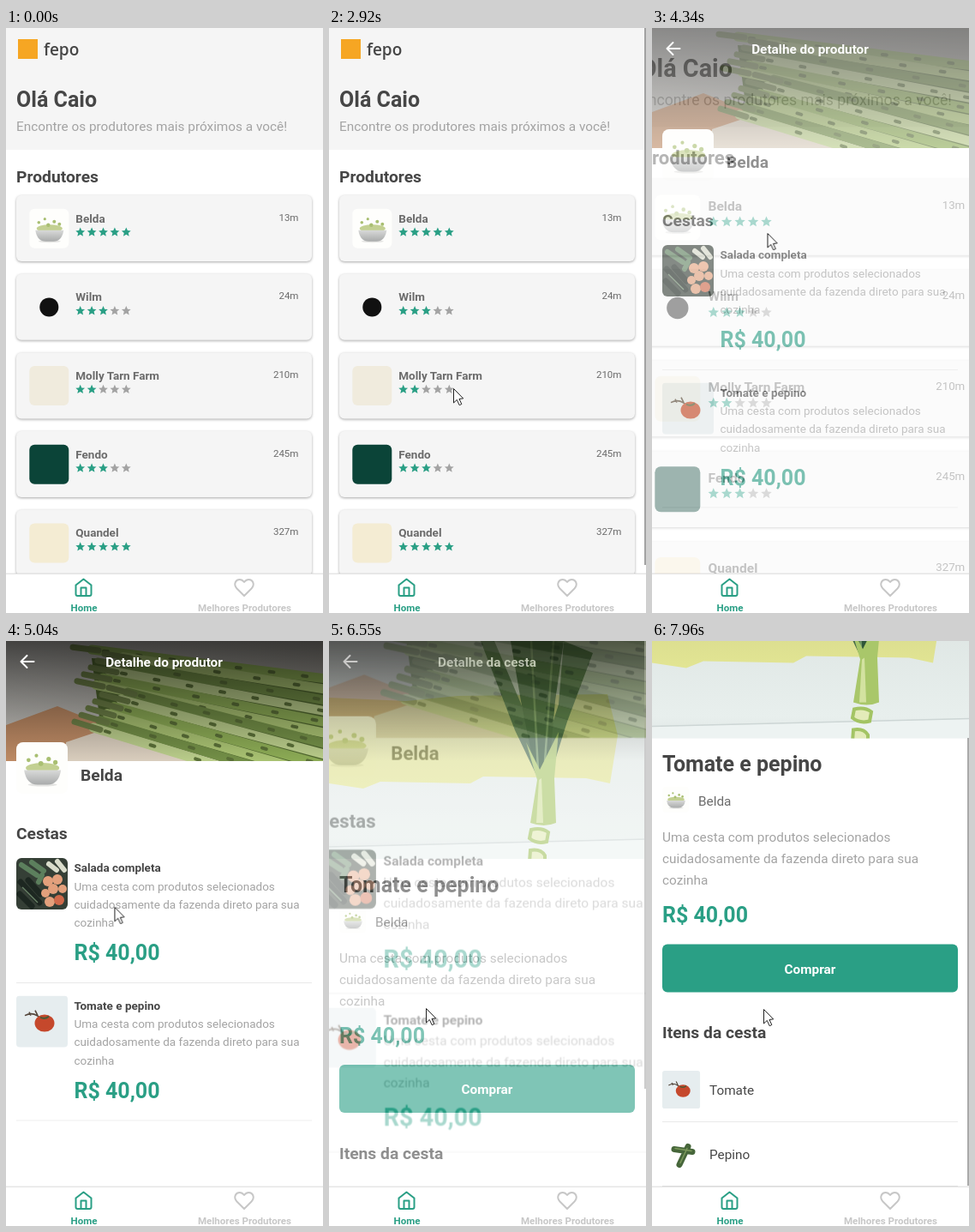
Write an HTML page that moves like this. It is 370 px wide and 682 px high and loops after 8 s.

```html
<!DOCTYPE html>
<html lang="pt-BR">
<head>
<meta charset="utf-8">
<title>Produtores</title>
<style>
html, body { margin: 0; width: 100%; height: 100%; overflow: hidden; background: #fff; }
#stage { display: block; width: 100%; height: 100%; --teal: #2a9f85; --ink: #464646; --mid: #6b6b6b; --soft: #a3a3a3; }
text { font-family: Roboto, sans-serif; fill: var(--ink); }
.h1 { font-size: 25px; font-weight: 700; }
.h2 { font-size: 19.27px; font-weight: 700; }
.p { font-size: 15.35px; }
.s { font-size: 13.5px; }
.xs { font-size: 11.56px; }
.b { font-weight: 700; }
.soft { fill: var(--soft); }
.mid { fill: var(--mid); }
.teal { fill: var(--teal); }
.white { fill: #fff; }
.end { text-anchor: end; }
.c { text-anchor: middle; }
.card { fill: #f5f5f5; filter: drop-shadow(0 1.8px 1.4px rgba(0, 0, 0, .34)); }
.line { stroke: #e9e9e9; }
.ico { fill: none; stroke: currentColor; stroke-width: 2; stroke-linejoin: round; stroke-linecap: round; }
.tab text { fill: currentColor; }

.anim { animation: 8s step-end infinite; transform-origin: 185px 318px; }
#home { animation-name: homeOut; }
#best { animation-name: best; }
#detail { animation-name: detail; }
#basket { animation-name: basket; }
#scroll { animation-name: scroll; }
#bar { animation-name: bar; }
#homeBar { animation-name: homeBar; }
#tabHome { animation-name: tabHome; }
#tabBest { animation-name: tabBest; }
#cursor { animation-name: cursor; }
#pick { animation-name: pick; }
#cards .first .card { --low: .75; animation: tap 8s step-end infinite, flat 8s step-end infinite; }
#cards .first .body { --low: .2; animation: tap 8s step-end infinite; }

/* Tabs */
@keyframes best { 0% { opacity: 0 } 17.5% { opacity: 1 } 30.25%, 100% { opacity: 0 } }
@keyframes tabHome { 0% { color: #2a9f85 } 17.5% { color: #c7c7c7 } 30.25%, 100% { color: #2a9f85 } }
@keyframes tabBest { 0% { color: #c7c7c7 } 17.5% { color: #2a9f85 } 30.25%, 100% { color: #c7c7c7 } }
@keyframes homeBar { 0% { opacity: 0 } 30.25% { opacity: .9 } 50.5% { opacity: .65 } 53%, 100% { opacity: 0 } }

/* Taps */
@keyframes tap {
  0% { opacity: 1 }
  44% { opacity: 1; animation-timing-function: steps(3, start) }
  48.125% { opacity: var(--low) }
  53%, 100% { opacity: 1 }
}
@keyframes flat { 45.5% { filter: drop-shadow(0 0 1.5px rgba(0, 0, 0, .08)) } 53% { filter: drop-shadow(0 1.8px 1.4px rgba(0, 0, 0, .34)) } }
@keyframes pick {
  0% { opacity: 1 }
  74.375% { opacity: 1; animation-timing-function: steps(2, start) }
  76.875% { opacity: .2 }
  80.625%, 100% { opacity: 1 }
}

/* Screen changes: the old one grows, the new one fades in */
@keyframes homeOut { 0% { transform: none } 53% { transform: scale(1.08) } 54.25%, 100% { transform: scale(1.152) } }
@keyframes detail {
  0% { opacity: 0; transform: none }
  53% { opacity: .25; transform: scale(.95) }
  54.25% { opacity: .6; transform: none }
  55.5% { opacity: 1; transform: none }
  80.625% { opacity: 1; transform: scale(1.08) }
  81.875%, 100% { opacity: 1; transform: scale(1.152) }
}
@keyframes basket {
  0% { opacity: 0; transform: none }
  80.625% { opacity: .25; transform: scale(.95) }
  81.875% { opacity: .6; transform: none }
  83.125%, 100% { opacity: 1; transform: none }
}
@keyframes scroll {
  0% { transform: none }
  94.5% { transform: translateY(-20px) }
  95.75% { transform: translateY(-56px) }
  97% { transform: translateY(-92px) }
  98.25% { transform: translateY(-122px) }
  99.5%, 100% { transform: translateY(-140.5px) }
}
@keyframes bar {
  0% { transform: none }
  94.5% { transform: translateY(16px) }
  95.75% { transform: translateY(45px) }
  97% { transform: translateY(74px) }
  98.25% { transform: translateY(98px) }
  99.5%, 100% { transform: translateY(113px) }
}

@keyframes cursor {
  0% { transform: translate(322px, 690px) }
  6.25% { transform: translate(322px, 687px); animation-timing-function: steps(4, start) }
  11.25% { transform: translate(274px, 651px) }
  20% { transform: translate(274px, 651px); animation-timing-function: steps(5, start) }
  26.5625% { transform: translate(91px, 659px) }
  32.75% { transform: translate(91px, 659px); animation-timing-function: steps(4, start) }
  37.75% { transform: translate(145px, 420px); animation-timing-function: steps(4, start) }
  42.75% { transform: translate(134.5px, 239px) }
  60.5% { transform: translate(134.5px, 239px); animation-timing-function: steps(8, start) }
  70.5% { transform: translate(113px, 428px) }
  85.625% { transform: translate(113px, 428px); animation-timing-function: steps(2, start) }
  88.125%, 100% { transform: translate(130px, 429px) }
}
</style>
</head>
<body>
<svg id="stage" viewBox="0 0 370 682" preserveAspectRatio="none">
  <defs>
    <linearGradient id="shade" x2="0" y2="1">
      <stop stop-color="#000" stop-opacity=".66"/>
      <stop offset="1" stop-color="#000" stop-opacity="0"/>
    </linearGradient>
    <linearGradient id="room">
      <stop stop-color="#c4c2bd"/>
      <stop offset="1" stop-color="#a09d96"/>
    </linearGradient>
    <linearGradient id="wall" x2="0" y2="1">
      <stop stop-color="#d3dcd9"/>
      <stop offset=".9" stop-color="#e8efed"/>
      <stop offset="1" stop-color="#dfe6e5"/>
    </linearGradient>
    <linearGradient id="paint" x2="0" y2="1">
      <stop stop-color="#cfd08a"/>
      <stop offset="1" stop-color="#e2e593"/>
    </linearGradient>
    <linearGradient id="china" x2="0" y2="1">
      <stop stop-color="#d9dad9"/>
      <stop offset="1" stop-color="#a9abab"/>
    </linearGradient>
    <path id="star" d="M0-5.6 1.6-1.9 5.4-1.6 2.5.9 3.4 4.7 0 2.7-3.4 4.7-2.5.9-5.4-1.6-1.6-1.9z"/>
    <g id="bowl">
      <rect width="46" height="46" rx="6" fill="#fefefc"/>
      <ellipse cx="23.5" cy="38" rx="13" ry="1.5" fill="#e4e4e2"/>
      <ellipse cx="23.5" cy="23" rx="15" ry="4.500" fill="#c3d092"/>
      <g fill="#a9bf72">
        <circle cx="11" cy="16" r="1.800"/><circle cx="18" cy="12" r="1.600"/><circle cx="22" cy="19" r="2.200"/>
        <circle cx="29" cy="15" r="2"/><circle cx="35" cy="18" r="2"/>
      </g>
      <path d="M7 25h33q-2 13-12 13h-9Q9 38 7 25z" fill="url(#china)"/>
    </g>
    <g id="tomato">
      <rect width="60" height="60" rx="4" fill="#e6edef"/>
      <path d="M10 23q8-4 14 0t12 4M22 17l3 6M15 19l2 4" fill="none" stroke="#54463b" stroke-width="1.6"/>
      <ellipse cx="33" cy="32" rx="11.5" ry="10" fill="#c5482c"/>
      <path d="M28 25q5 3 10-1" fill="none" stroke="#4f5a35" stroke-width="2"/>
    </g>
    <g id="greens">
      <rect width="60" height="60" rx="6" fill="#353f36"/>
      <path d="M5 28l22 24M4 42l14 14M14 26l14 16" stroke="#1d2721" stroke-width="7" stroke-linecap="round"/>
      <path d="M6 8l18 12M18 5l14 10M30 20l-4 8" stroke="#5c7f5d" stroke-width="6" stroke-linecap="round"/>
      <path d="M7 34l18 18" stroke="#6b8468" stroke-width="1.5"/>
      <g fill="#e3a07c">
        <circle cx="37" cy="27" r="6"/><circle cx="48" cy="25" r="6"/><circle cx="43" cy="36" r="6"/>
        <circle cx="54" cy="36" r="5"/><circle cx="34" cy="41" r="5"/><circle cx="39" cy="51" r="6"/>
      </g>
      <path d="M38 7l9 7M48 4l8 10" stroke="#d9dccb" stroke-width="6" stroke-linecap="round"/>
      <circle cx="50" cy="49" r="6" fill="#d0694a"/>
    </g>
    <path id="back" class="ico" d="M16 8H1M8 1 1 8l7 7"/>
  </defs>

  <rect width="370" height="682" fill="#fff"/>

  <g id="home" class="anim">
    <rect width="370" height="636" fill="#fff"/>
    <rect width="370" height="142" fill="#f5f5f5"/>
    <g class="brand"></g>
    <text class="h1" x="12" y="91.500">Olá Caio</text>
    <text class="p soft" x="12" y="120">Encontre os produtores mais próximos a você!</text>
    <text class="h2" x="12" y="179.800">Produtores</text>
    <g id="cards"></g>
    <rect id="homeBar" class="anim" x="368" width="2" height="626" fill="#999"/>
  </g>

  <g id="best" class="anim">
    <rect width="370" height="636" fill="#fff"/>
    <rect width="370" height="135" fill="#f5f5f5"/>
    <g class="brand"></g>
    <text class="p soft" x="12" y="113.500">Veja os produtores com 4+ estrelas!</text>
    <text class="h2" x="12" y="173.300">Produtores</text>
    <g id="topCards" transform="translate(0 -6.5)"></g>
  </g>

  <g id="detail" class="anim">
    <rect width="370" height="636" fill="#fff"/>
    <svg width="370" height="140">
      <rect width="370" height="140" fill="url(#room)"/>
      <path d="M0 98 60 76 120 100 180 140H0z" fill="#bd8a64"/>
      <path d="M70 118 130 98 300 140H70z" fill="#d9cdbd"/>
      <path d="M100 20 370 40V140H250L110 96z" fill="#50672f"/>
      <g id="spears" stroke-linecap="round"></g>
      <rect width="370" height="140" fill="url(#shade)"/>
    </svg>
    <use href="#back" x="16.5" y="16" color="#fff"/>
    <text class="p b white c" x="184.5" y="30">Detalhe do produtor</text>
    <use href="#bowl" transform="translate(12 118) scale(1.304)"/>
    <text class="h2" x="87" y="162.500">Belda</text>
    <text class="h2" x="12" y="230.500">Cestas</text>
    <g id="offers"></g>
  </g>

  <g id="basket" class="anim">
    <rect width="370" height="636" fill="#fff"/>
    <g id="scroll" class="anim">
      <svg width="370" height="254">
        <rect width="370" height="254" fill="url(#wall)"/>
        <path d="M0 66 90 70 150 64 325 62 337 110 328 166 300 160 180 158 165 166 60 164 40 172 0 166z" fill="url(#paint)"/>
        <path d="M0 240 370 231V254H0z" fill="#edf3f2"/>
        <path d="M0 240 370 231" stroke="#cdd6d5" stroke-width="1.5"/>
        <path d="M177 0h16l34 80 20 50-6 24-24-50z" fill="#44694a"/>
        <path d="M274 0l34 14-30 80-22 70-14-10 26-80z" fill="#3c6444"/>
        <path d="M212 0h62l-10 70-8 90-16-10-16-80z" fill="#2f5539"/>
        <path d="M236 0l8 150M262 0l-10 140" stroke="#6f9565" stroke-width="2.5" fill="none"/>
        <path d="M230 118l16 32 22-44-5 54 2 52q-14 6-30 0l8-50z" fill="#a9c76a"/>
        <path d="M248 160l2 52h-8l3-50z" fill="#d3e2a0"/>
        <g fill="#e3ebb9" stroke="#a3c464" stroke-width="4">
          <path d="M236 220q12-3 20 3l-2 11q-12 3-20-4z"/>
          <path d="M235 244q12-2 17 6v8h-18z"/>
        </g>
        <rect width="370" height="140" fill="url(#shade)"/>
      </svg>
      <use href="#back" x="16.5" y="16" color="#fff"/>
      <text class="p b white c" x="184.5" y="30">Detalhe da cesta</text>
      <text class="h1" x="12" y="292.500">Tomate e pepino</text>
      <use href="#bowl" transform="translate(12.5 310) scale(.66)"/>
      <text class="p mid" x="54" y="332.500">Belda</text>
      <g id="about"></g>
      <text class="h1 teal" x="12" y="468.500">R$ 40,00</text>
      <rect class="teal" x="12" y="494" width="345" height="56" rx="6"/>
      <text class="p b white c" x="184.5" y="528">Comprar</text>
      <text class="h2" x="12" y="603.500">Itens da cesta</text>
      <use href="#tomato" transform="translate(12 641.5) scale(.735)"/>
      <text class="p" x="67" y="669">Tomate</text>
      <path class="line" d="M12 701h345M12 776h345"/>
      <g stroke-linecap="round" fill="none">
        <path d="M26 733 47 736M42 730 32 751" stroke="#46663a" stroke-width="7"/>
        <path d="M27 732 46 735M41 732 33 749" stroke="#7d9a5c" stroke-width="1.5"/>
      </g>
      <text class="p" x="67" y="744.500">Pepino</text>
    </g>
    <rect id="bar" class="anim" x="368" width="2" height="522" fill="#aaa"/>
  </g>

  <rect y="635" width="370" height="1" fill="#000" opacity=".05"/>
  <rect y="636" width="370" height="46" fill="#fff"/>
  <rect y="636" width="370" height="1" fill="#e6e6e6"/>
  <g id="tabHome" class="anim tab">
    <path class="ico" d="M81.5 649.5 90.5 642.5 99.5 649.5V660q0 2-2 2h-14q-2 0-2-2zM87.5 662V652.500h6V662"/>
    <text class="xs b c" x="91" y="680">Home</text>
  </g>
  <g id="tabBest" class="anim tab">
    <path class="ico" d="M278 662 269.500 653.500C265 648.500 268 643 272.700 643 275.500 643 277 644.700 278 646 279 644.700 280.500 643 283.300 643 288 643 291 648.500 286.500 653.500z"/>
    <text class="xs b c" x="278.5" y="680">Melhores Produtores</text>
  </g>

  <path id="cursor" class="anim" d="M.5.5V17l3.8-3.6 2.9 6.3 2.6-1.2-2.8-6.1 4.700-.5z" fill="#fff" stroke="#222" stroke-linejoin="round"/>
</svg>

<script>
const put = (sel, html) => document.querySelectorAll(sel).forEach(el => { el.innerHTML = html; });
const tile = color => `<rect width="46" height="46" rx="6" fill="${color}"/>`;
const bowl = '<use href="#bowl"/>';
const dot = '<circle cx="23" cy="23" r="11" fill="#111"/>';

const producers = [
  ['Belda', 13, 5, bowl],
  ['Wilm', 24, 3, dot],
  ['Molly Tarn Farm', 210, 2, tile('#f0ebdd')],
  ['Fendo', 245, 3, tile('#0b4438')],
  ['Quandel', 327, 5, tile('#f4ecd3')],
];

const stars = n => [0, 1, 2, 3, 4].map(i =>
  `<use href="#star" x="${86.7 + i * 13.4}" y="43" class="${i < n ? 'teal' : 'soft'}"/>`).join('');

const card = ([name, metres, rate, logo], i) => `
  <g transform="translate(0 ${195 + i * 91.7})" class="${i ? '' : 'first'}">
    <rect class="card" x="12" width="345" height="77" rx="6"/>
    <g class="body">
      <g transform="translate(27.3 15.7)">${logo}</g>
      <text class="s b mid" x="81.3" y="31.700">${name}</text>
      <text class="xs mid end" x="341.5" y="29.700">${metres}m</text>
      ${stars(rate)}
    </g>
  </g>`;

put('.brand', `<rect x="14" y="13" width="23" height="23" fill="#f6a623"/>
  <text x="44" y="31.500" style="font: 600 19px 'Open Sans', sans-serif">fepo</text>`);
put('#cards', producers.map(card).join(''));
put('#topCards', producers.filter(p => p[2] > 3).map(card).join(''));

const blurb = ['Uma cesta com produtos selecionados', 'cuidadosamente da fazenda direto para sua', 'cozinha'];
const lines = (cls, x, y, step) => blurb.map((s, i) =>
  `<text class="${cls} soft" x="${x}" y="${y + i * step}">${s}</text>`).join('');

const offer = (name, pic, y, id) => `
  <g transform="translate(0 ${y})"><g ${id ? `id="${id}" class="anim"` : ''}>
    <use href="#${pic}" x="12"/>
    <text class="s b" x="79.5" y="16.200">${name}</text>
    ${lines('s', 79.5, 37.6, 21.2)}
    <text class="h1 teal" x="79.5" y="119">R$ 40,00</text>
    <path class="line" d="M12 145.500h345"/>
  </g></g>`;
put('#offers', offer('Salada completa', 'greens', 253) + offer('Tomate e pepino', 'tomato', 413.6, 'pick'));
put('#about', lines('p', 12, 374.7, 25));

// Asparagus stalks fanning out to the right, each with a tip and leaf scales
const tints = ['#8cab55', '#a9c272', '#738f47', '#b9cc8a'];
put('#spears', Array.from({ length: 12 }, (_, i) => {
  const x = 84 + i * 37 % 45, y = 8 + i * 8, end = 46 + i * 13;
  const slope = (end - y) / (390 - x);
  const at = d => `${x + d} ${y + d * slope}`;
  return `<path d="M${at(16)}L390 ${end}" stroke="${tints[i % 4]}" stroke-width="11"/>
    <path d="M${at(-6)}L${at(24)}" stroke="#6f8248" stroke-width="7"/>
    <path d="M${at(30)}L390 ${end}" stroke="#5b7038" stroke-width="4" stroke-dasharray="5 ${34 + i % 3 * 8}"/>`;
}).join(''));
</script>
</body>
</html>
```
